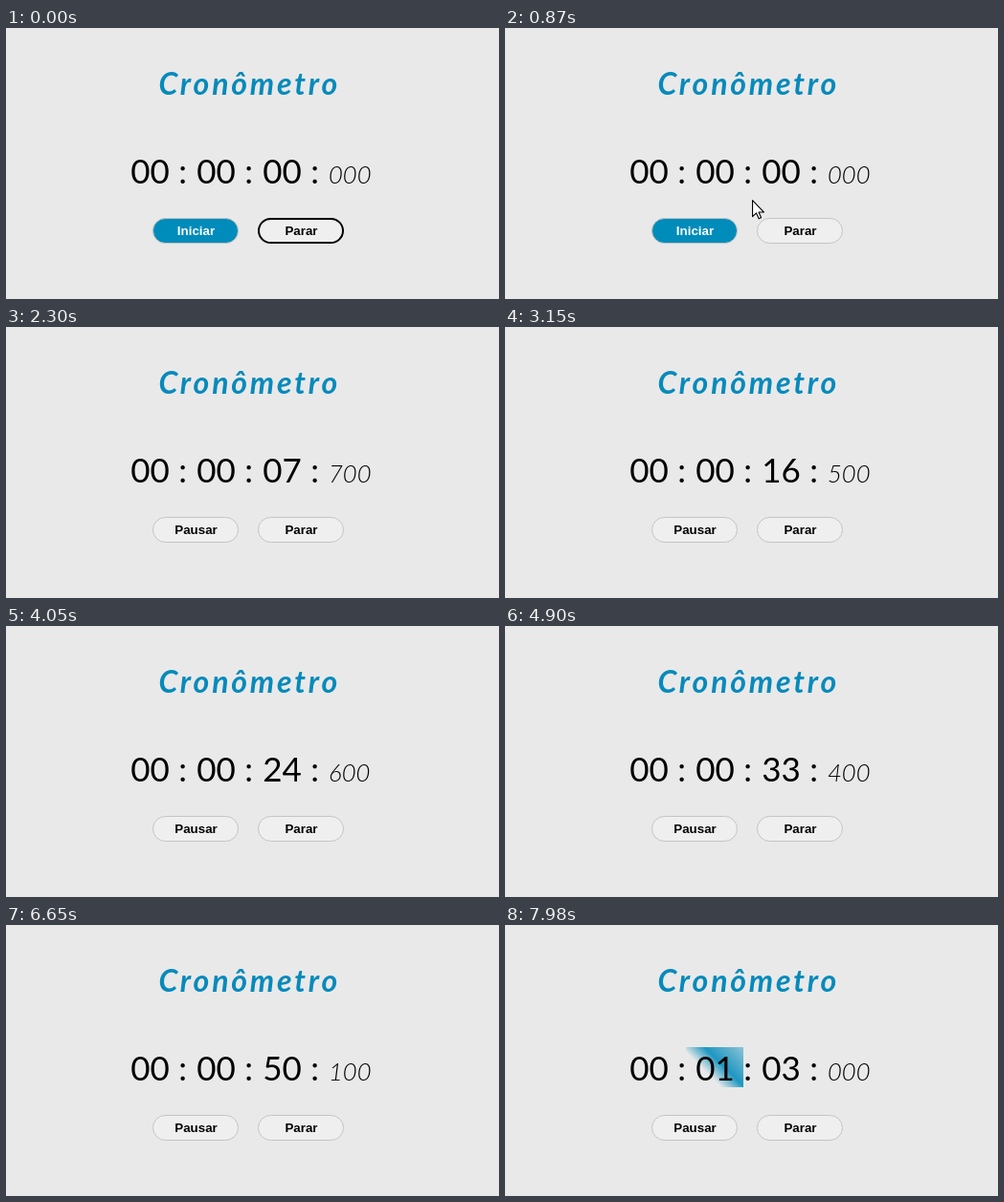
Write an HTML page with a canvas that moves like this. It is 515x284 px and loops after 8000 ms.

```html
<!DOCTYPE html>
<html lang="pt">
<head>
<meta charset="utf-8">
<title>Cronômetro</title>
<style>
  html, body { margin: 0; width: 100%; height: 100%; overflow: hidden; background: #e9e9e9; }
  canvas { display: block; }
</style>
</head>
<body>
<canvas id="stage" width="515" height="284"></canvas>
<script>
const ctx = document.getElementById('stage').getContext('2d');
const LOOP = 8000, STEP = 70;
const BG = '#e9e9e9', BLUE = '#008cba';
const ENTER = 400, ARRIVE = 1260, CLICK = 1470, LEAVE = 1610, GONE = 1750;
const BUTTON_Y = 212.5, START_X = 198, STOP_X = 308;

// Fast-forwarded clock readings: [ms, seconds]
const readings = [[CLICK, 0.25], [4900, 33.4], [6650, 50.1], [7980, 63]];

const hand = new Path2D('M-2 14V2a2 2 0 0 1 4 0V9q3-1.5 3.3 1 3-1 3.3 1 2.4-.4 2.4 1.8V17q0 2-1.5 4V24H0V22q-2.5-3-5.6-7.5c-1-2 1.4-3 3.6-.5z');
const knuckles = new Path2D('M2 8.5V13M5.3 10V13.5M8.6 11V14');
const arrow = new Path2D('M0 0V17L4 13.3 6.6 19.2 9 18.2 6.5 12.4H12Z');

const clamp = v => Math.min(1, Math.max(0, v));
const bezier = (a, b, c, s) => (1 - s) ** 2 * a + 2 * s * (1 - s) * b + s * s * c;

function secondsAt(t) {
  if (t < CLICK) return 0;
  const i = Math.max(1, readings.findIndex(r => r[0] >= t));
  const [t0, v0] = readings[i - 1], [t1, v1] = readings[i];
  return v0 + (v1 - v0) * (t - t0) / (t1 - t0);
}

// Scale of a button that grows while hovered between two times
function hoverScale(t, on, off, ramp = 140) {
  return 1 + 0.1 * (clamp((t - on) / ramp) - clamp((t - off) / ramp));
}

function text(str, x, y, font, color, align = 'center', spacing = 0) {
  ctx.font = font;
  ctx.fillStyle = color;
  ctx.textAlign = align;
  ctx.letterSpacing = spacing + 'px';
  ctx.fillText(str, x, y);
}

function button(label, x, scale, { fill = '#efefef', color = '#000', border = '#c4c4c4', line = 1 } = {}) {
  ctx.save();
  ctx.translate(x, BUTTON_Y);
  ctx.scale(scale, scale);
  ctx.beginPath();
  ctx.roundRect(-45 + line / 2, -13.5 + line / 2, 90 - line, 27 - line, 13.5 - line / 2);
  ctx.fillStyle = fill;
  ctx.fill();
  ctx.strokeStyle = border;
  ctx.lineWidth = line;
  ctx.stroke();
  text(label, 0.5, 4.5, 'bold 13.333px "Liberation Sans", Arial, sans-serif', color);
  ctx.restore();
}

function highlight() {
  const g = ctx.createLinearGradient(193.5, 174.5, 244.5, 123.5);
  g.addColorStop(0.36, BG);
  g.addColorStop(0.6, '#1f97c2');
  g.addColorStop(1, '#8cc3d6');
  ctx.fillStyle = g;
  ctx.fillRect(189, 128, 60, 42);
}

function clock(seconds) {
  const pad = (n, len = 2) => String(n).padStart(len, '0');
  const tenths = Math.round(seconds * 10);
  const whole = Math.floor(tenths / 10);
  const minutes = Math.floor(whole / 60);
  if (minutes) highlight();
  const font = '35px Lato, sans-serif';
  [0, minutes, whole % 60].forEach((n, i) => {
    text(pad(n), 150.5 + 69 * i, 163, font, '#000');
    text(':', 184.7 + 69 * i, 163, font, '#000');
  });
  text(pad(tenths % 10 * 100, 3), 337, 163, 'italic 300 25.6px Lato, sans-serif', '#000', 'left');
}

function cursor(t) {
  if (t < ENTER || t > GONE) return;
  const s = Math.sin(clamp((t - ENTER) / (ARRIVE - ENTER)) * Math.PI / 2);
  const exit = clamp((t - LEAVE) / (GONE - LEAVE));
  const x = bezier(300, 320, 204.5, s) + 6 * exit;
  const y = bezier(280, 130, 205, s) + 30 * exit * exit;
  const over = Math.abs(y - BUTTON_Y) < 13.5 &&
    [START_X, STOP_X].some(cx => Math.abs(x - cx) < 45);
  const shape = over ? hand : arrow;
  ctx.save();
  ctx.translate(x, y);
  ctx.fillStyle = '#fff';
  ctx.strokeStyle = '#000';
  ctx.lineWidth = 1.1;
  ctx.lineJoin = 'round';
  ctx.fill(shape);
  ctx.stroke(shape);
  if (over) ctx.stroke(knuckles);
  ctx.restore();
}

function draw(now) {
  const t = Math.floor(now % LOOP / STEP) * STEP;
  const running = t >= CLICK;
  ctx.fillStyle = BG;
  ctx.fillRect(0, 0, 515, 284);
  text('Cronômetro', 254.2, 70, 'italic bold 32px Lato, sans-serif', '#078abb', 'center', 2.8);
  clock(secondsAt(t));
  button(running ? 'Pausar' : 'Iniciar', START_X, hoverScale(t, 1050, 1680),
    running ? {} : { fill: BLUE, color: '#fff' });
  button('Parar', STOP_X, hoverScale(t, 530, 600),
    t < STEP ? { border: '#000', line: 2 } : {});
  cursor(t);
}

const begin = performance.now();
(function loop() {
  draw(performance.now() - begin);
  requestAnimationFrame(loop);
})();
</script>
</body>
</html>
```
